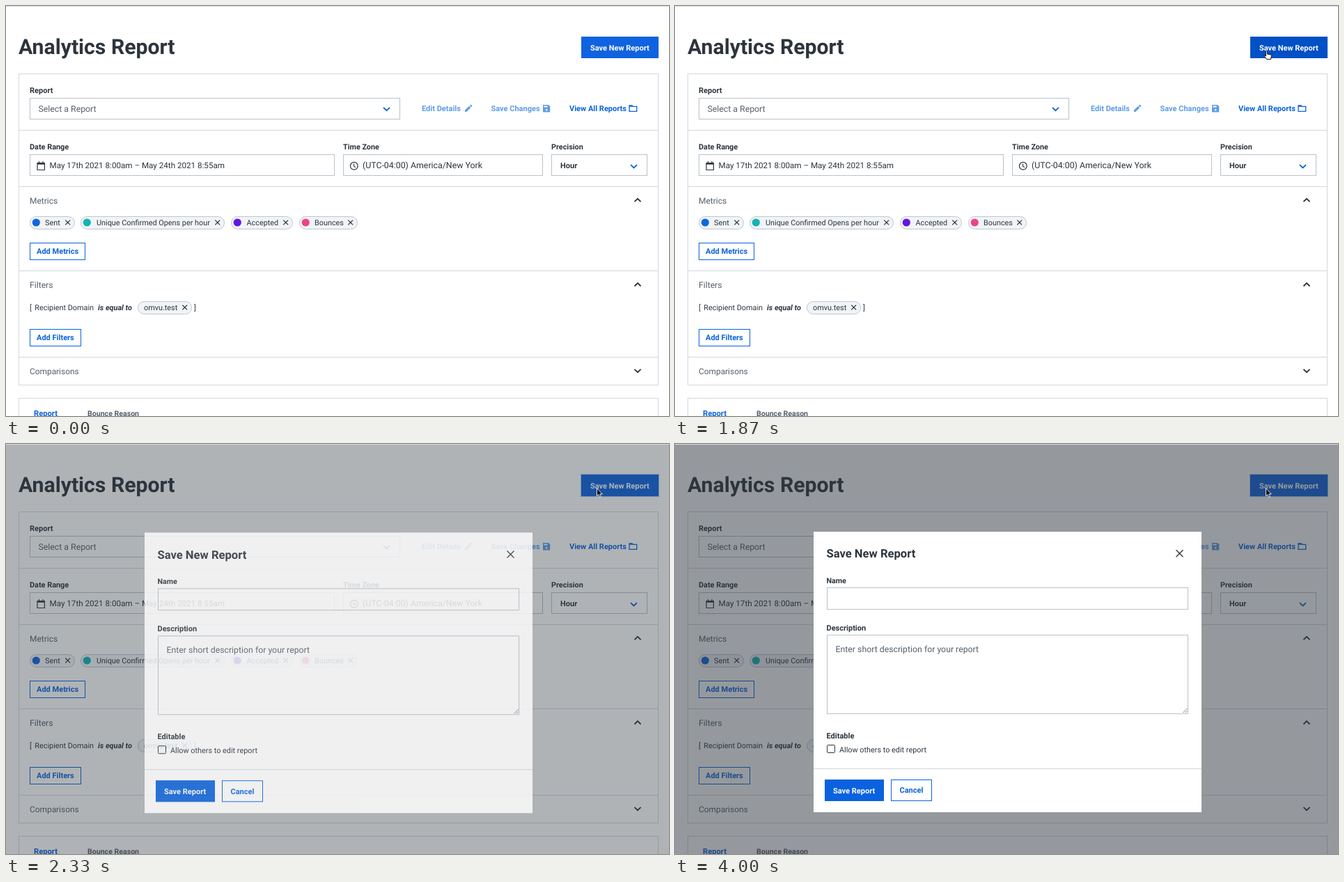
These frames come from a looping animation (952 px wide and 589 px high, 4.53 s). An HTML page:

```html
<!DOCTYPE html>
<html lang="en">
<head>
<meta charset="utf-8">
<title>Analytics Report</title>
<style>
  html, body { margin: 0; width: 100%; height: 100%; overflow: hidden; background: #fff; }
  svg { display: block; width: 952px; height: 589px; }
  text { font-family: Roboto, sans-serif; text-rendering: geometricPrecision; white-space: pre; }
</style>
</head>
<body>
<svg id="stage" viewBox="0 0 952 589"></svg>
<script>
const LOOP = 4530;
const INK = '#2c353d', GREY = '#55606a', BLUE = '#0b62de', PALE = '#5c9ce8';
const RULE = '#d3d8dd', FIELD = '#b9c2ca';

// Static drawing helpers
const text = (x, y, s, fill = INK, size = 11, weight = 600, extra = '') =>
  `<text x="${x}" y="${y}" fill="${fill}" font-size="${size}" font-weight="${weight}" ${extra}>${s}</text>`;
const plain = (x, y, s, fill = INK, size = 10.85) => text(x, y, s, fill, size, 400);
const box = (x1, y1, x2, y2, stroke = FIELD, fill = 'none', r = 0) =>
  `<rect x="${x1 + .5}" y="${y1 + .5}" width="${x2 - x1}" height="${y2 - y1}" rx="${r}" stroke="${stroke}" fill="${fill}"/>`;
const path = (d, stroke = INK, width = 1.3, fill = 'none') =>
  `<path d="${d}" stroke="${stroke}" stroke-width="${width}" fill="${fill}"/>`;
const rule = (x1, x2, y) => path(`M${x1} ${y + .5}H${x2}`, RULE, 1);
const cross = (x, y, r) => path(`M${x - r} ${y - r}l${2 * r} ${2 * r}m0 ${-2 * r}l${-2 * r} ${2 * r}`);
const chevron = (x, y, dir, color = INK) =>
  path(`M${x - 4.5} ${y - 2.2 * dir}l4.5 ${4.4 * dir}l4.5 ${-4.4 * dir}`, color, 1.8);
const chip = (x1, x2, y, textX, label, color) =>
  box(x1, y - 9, x2, y + 9, '#bcc8d3', '#f1f4f7', 9) +
  (color ? `<circle cx="${x1 + 9.3}" cy="${y}" r="5.6" fill="${color}"/>` : '') +
  plain(textX, y + 4, label) + cross(x2 - 9.3, y, 3.4);
const outlineButton = (x1, y1, x2, y2, textX, label) =>
  box(x1, y1, x2, y2, BLUE, '#fff') + text(textX, (y1 + y2) / 2 + 4.3, label, BLUE);

const calendar = path('M45 225.5h10.4v10H45zM47.5 223v2m5.5-2v2', INK, 1.2) + path('M45 226.5h10.4', INK, 2.4);
const clock = '<circle cx="499.8" cy="229.8" r="5.4" fill="none" stroke="#2c353d" stroke-width="1.2"/>' +
  path('M499.5 226.5v3.6l2.6 1.6', INK, 1.1);
const pencil = path('M659 152v-2.3l6-6l2.3 2.3l-6 6zM665.8 142.9l1-1q.6-.4 1.1 0l1.2 1.2q.4.5 0 1.1l-1 1z', 'none', 0, PALE);
const floppy = path('M771 142h8l2.2 2.2v8.3H771z', 'none', 0, PALE) +
  path('M772.4 143.4h5.2v2h-5.2zM774.7 149.3a1.4 1.4 0 1 0 2.8 0a1.4 1.4 0 1 0-2.8 0', 'none', 0, '#fff');
const folder = path('M895 151.4v-8.6h4l1.3 1.5h5.4v7.1zM895 144.2h5', BLUE, 1.3);

const page =
  text(18, 69, 'Analytics Report', INK, 30.2) +
  '<rect id="save" x="826" y="44" width="111" height="31"/>' +
  `<g id="focus">${box(825, 43, 937, 75, '#a9c9f3')}</g>` +
  text(839, 63.7, 'Save New Report', '#fff') +
  box(18, 97, 936, 544, RULE) + [178, 259, 380, 504].map(y => rule(18, 936, y)).join('') +
  text(34, 124.5, 'Report') + box(34, 132, 565, 162) +
  plain(46.5, 151.8, 'Select a Report', GREY, 12.3) + chevron(546.5, 148, 1, BLUE) +
  text(597, 151, 'Edit Details', PALE) + pencil +
  text(696.5, 151, 'Save Changes', PALE) + floppy +
  text(809, 151, 'View All Reports', BLUE) + folder +
  text(34, 206, 'Date Range', INK, 10.9) + box(34, 213, 471, 243) + calendar +
  plain(62.5, 233.2, 'May 17th 2021 8:00am – May 24th 2021 8:55am', INK, 11.65) +
  text(484, 206, 'Time Zone', INK, 10.8) + box(484, 213, 770, 243) + clock +
  plain(512, 233.2, '(UTC-04:00) America/New York', INK, 12.35) +
  text(783, 206, 'Precision', INK, 10.8) + box(783, 213, 920, 243) +
  text(796, 233, 'Hour', INK, 11) + chevron(901.5, 230.3, 1, BLUE) +
  plain(34, 284, 'Metrics', GREY, 12) + chevron(907, 279, -1) +
  chip(34, 98, 311, 56, 'Sent', '#0f66e0') +
  chip(107, 313, 311, 130, 'Unique Confirmed Opens per hour', '#13b3b3') +
  chip(323, 411, 311, 345.5, 'Accepted', '#6316e0') +
  chip(421, 504, 311, 443, 'Bounces', '#ec4488') +
  outlineButton(34, 340, 113, 364, 44, 'Add Metrics') +
  plain(34, 405, 'Filters', GREY, 12.2) + chevron(907, 400.3, -1) +
  plain(34, 437, '[') + plain(41.3, 437, 'Recipient Domain') +
  text(132, 437, 'is equal to', INK, 10.85, 700, 'font-style="italic"') +
  chip(189, 266, 433, 198, 'omvu.test') + plain(270, 437, ']') +
  outlineButton(34, 464, 107, 488, 44, 'Add Filters') +
  plain(34, 529, 'Comparisons', GREY, 11.9) + chevron(907, 524, 1) +
  box(18, 563, 936, 600, RULE) +
  text(40, 589, 'Report', BLUE, 11.2) + text(117, 589, 'Bounce Reason', GREY, 10.6);

const modal =
  '<rect x="199" y="126" width="557" height="403" fill="#fff"/>' +
  text(217.5, 163.3, 'Save New Report', INK, 16.6) + cross(724.5, 157.3, 5) +
  text(217.5, 199.7, 'Name', INK, 10.7) + box(218, 206, 736, 237) +
  text(217.5, 268, 'Description') + box(218, 274, 736, 387) +
  plain(230.5, 298.5, 'Enter short description for your report', GREY, 12.3) +
  path('M729.5 386l6-6m-2.6 6l2.6-2.6', '#777', .9) +
  text(217.5, 422.5, 'Editable') + box(218, 432, 229, 443, INK, '#fff', 1) +
  plain(236, 442.5, 'Allow others to edit report') + rule(199, 756, 466) +
  box(215, 482, 299, 512, BLUE, BLUE) + text(227, 501.8, 'Save Report', '#fff') +
  outlineButton(310, 482, 368, 512, 322.5, 'Cancel');

document.getElementById('stage').innerHTML =
  '<rect width="952" height="589" fill="#fff"/>' + page +
  '<rect id="shade" width="952" height="589" fill="#2c353d"/>' +
  '<path d="M0 .5H952" stroke="#dadcde"/>' +
  `<g id="modal">${modal}</g>` +
  '<g id="cursor" stroke-linejoin="round">' +
  '<path id="arrow" d="M0 0v11l2.5-2.3l1.7 3.8l1.8-.8l-1.7-3.7h3.5z" fill="#000" stroke="#fff" stroke-width=".9"/>' +
  '<path id="hand" d="M0 1.2q0-1.2 1-1.2t1 1.2v4l5 1q1 .3 1 1.6l-.8 3.4v1.6h-6l-3.4-4.4q-.6-1.4.6-1.4l1.6 1.2z" fill="#fff" stroke="#000" stroke-width=".9"/></g>';

const part = Object.fromEntries(['save', 'focus', 'shade', 'modal', 'cursor', 'arrow', 'hand']
  .map(id => [id, document.getElementById(id)]));

const ramp = (t, from, to) => Math.min(1, Math.max(0, (t - from) / (to - from)));
const ease = (t, from, to) => { const u = ramp(t, from, to); return u * u * (3 - 2 * u); };
const mix = (a, b, u) => a + (b - a) * u;
const show = (el, on) => el.setAttribute('visibility', on ? 'visible' : 'hidden');

function render(t) {
  const enter = 1 - (1 - ramp(t, 620, 1130)) ** 2;
  const settle = ease(t, 1170, 1500);
  const x = mix(846, 850, enter) - 1.5 * settle;
  const y = t < 620 ? -20 : mix(-14, 62, enter) + 1.8 * settle;
  const pointing = y > 44 && t < 2200;
  part.cursor.setAttribute('transform', `translate(${x} ${y})`);
  show(part.arrow, !pointing);
  show(part.hand, pointing);
  show(part.focus, t >= 2200);

  const hover = ease(t, 880, 1080) * (1 - ease(t, 2190, 2300));
  part.save.setAttribute('fill', `rgb(${mix(15, 0, hover)},${mix(99, 80, hover)},${mix(224, 198, hover)})`);

  const shown = ease(t, 2100, 2420);
  part.shade.setAttribute('opacity', .5 * ease(t, 2230, 2380));
  part.modal.setAttribute('opacity', shown);
  part.modal.setAttribute('transform', `translate(0 ${6.6 * (1 - shown)})`);
}

function tick() {
  render(performance.now() % LOOP);
  requestAnimationFrame(tick);
}
tick();
</script>
</body>
</html>
```
